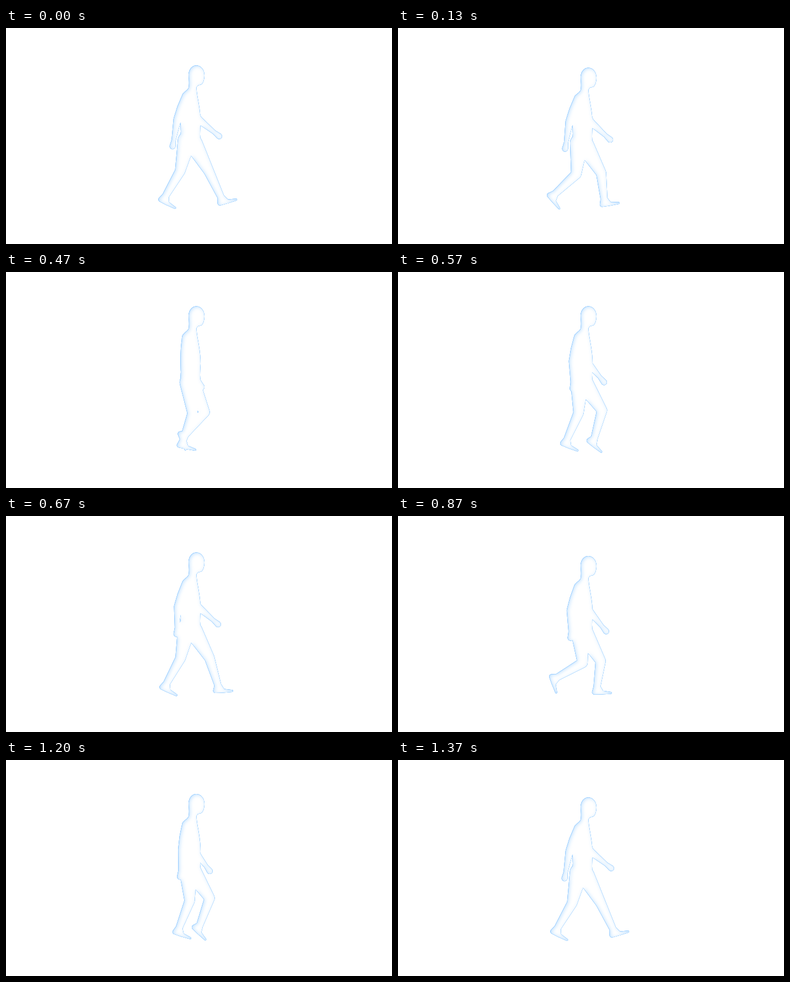
An HTML page with a canvas that plays this animation: 700 px wide and 394 px high, repeating every 1.41 s.

```html
<!DOCTYPE html>
<html lang="en">
<head>
<meta charset="utf-8">
<title>Walk cycle</title>
<style>
  html, body { margin: 0; width: 100%; height: 100%; overflow: hidden; background: #fff; }
  canvas { display: block; }
</style>
</head>
<body>
<canvas id="stage" width="700" height="394"></canvas>
<script>
const LOOP = 1410, STEPS = 40;
const W = 700, H = 394, ANKLE_FLOOR = 312;
const ctx = document.getElementById('stage').getContext('2d');
const outside = new OffscreenCanvas(W, H);
const octx = outside.getContext('2d');

// Eight evenly spaced leg poses from heel strike on, in degrees:
// thigh and shank lean forward from vertical, foot tips down from level
const legPoses = [
  [29, 25, -12], [30, -10, 4], [15.5, -16, 5], [1.5, -22, 24],
  [-12.5, -32, 33], [5, -60, 74], [15, -55, 86], [33, -20, 48]
];

const torso = new Path2D(
  'M331 41C333 30 331 26 331 16C332 6 338 0 345 0C353 0 360 7 360 18' +
  'C360 26 357 34 354 35L348 36.5L345.5 40C346 52 349 64 350 72' +
  'C352 84 353 95 353 105Q352 118 352 126L353 140L345 156L320 150' +
  'C316 140 316 130 317 120C316 100 316 70 320 56C322 49 324 48 328 45Z');

const rad = degrees => degrees * Math.PI / 180;
const wave = (step, lag = 0, period = STEPS) => Math.cos(2 * Math.PI * (step - lag) / period);
const mix = (a, b, s) => a.map((v, i) => v + (b[i] - v) * s);
const hang = ([x, y], length, lean) =>
  [x + length * Math.sin(rad(lean)), y + length * Math.cos(rad(lean))];

// Smooth periodic curve through the leg poses
function legPose(step) {
  const n = legPoses.length, u = step / STEPS * n;
  const i = Math.floor(u), s = u - i;
  const [a, b, c, d] = [-1, 0, 1, 2].map(o => legPoses[(i + o + n) % n]);
  return b.map((v, j) => v + s / 2 * (c[j] - a[j]
    + s * (2 * a[j] - 5 * v + 4 * c[j] - d[j] + s * (3 * (v - c[j]) + d[j] - a[j]))));
}

// Chain of tapered capsules; each joint is [[x, y], radius]
function limb(path, ...joints) {
  for (let i = 1; i < joints.length; i++) {
    const [[x0, y0], r0] = joints[i - 1], [[x1, y1], r1] = joints[i];
    const angle = Math.atan2(y1 - y0, x1 - x0);
    const ratio = (r0 - r1) / Math.hypot(x1 - x0, y1 - y0);
    const spread = Math.acos(Math.max(-1, Math.min(1, ratio)));
    const part = new Path2D();
    part.arc(x0, y0, r0, angle + spread, angle - spread + 2 * Math.PI);
    part.arc(x1, y1, r1, angle - spread, angle + spread);
    part.closePath();
    path.addPath(part);
  }
}

function addLeg(body, top, step) {
  const [thigh, shank, tip] = legPose(step);
  const sway = wave(step);
  const hip = [334 + 6 * sway, top + 140 + 3 * sway];
  const knee = hang(hip, 57, thigh);
  const ankle = hang(knee, 53, shank);
  ankle[1] = Math.min(ankle[1], ANKLE_FLOOR);
  const heel = hang(hang(ankle, 9.5, -tip), -4, 90 - tip);
  const toe = hang(heel, 30, 90 - tip);
  const arch = mix(heel, toe, .45);
  limb(body, [hip, 16.5], [knee, 9.3], [ankle, 6.3], [heel, 4.5], [arch, 3.6], [toe, 1.8]);
  limb(body, [ankle, 6.3], [arch, 3.6]);
}

function addArm(body, top, step, bend, swing) {
  const shoulder = [328.5, top + 57];
  const elbow = hang(shoulder, 45, 1 + 25 * wave(step, 1.5));
  const fore = bend + swing * wave(step, .5) + 4 * wave(step, .5, STEPS / 2);
  const hand = hang(elbow, 50, fore);
  limb(body, [shoulder, 9.5], [mix(shoulder, elbow, .5), 9.3], [elbow, 7],
    [mix(elbow, hand, .77), 3.8], [hand, 5.4]);
}

function bodyAt(step) {
  const body = new Path2D();
  const top = 67.5 + 5.6 * wave(step, 4.6, STEPS / 2);
  body.addPath(torso, new DOMMatrix([1, 0, 0, 1, 0, top]));
  addLeg(body, top, step % STEPS);
  addLeg(body, top, (step + 19.5) % STEPS);
  addArm(body, top, step, 20, 27);
  addArm(body, top, step + STEPS / 2, 16, 30);
  return body;
}

function innerGlow(color, blur, dx, dy) {
  ctx.shadowColor = color;
  ctx.shadowBlur = blur;
  ctx.shadowOffsetX = dx;
  ctx.shadowOffsetY = dy;
  ctx.drawImage(outside, 0, 0);
}

function draw(step) {
  const body = bodyAt(step);
  octx.globalCompositeOperation = 'source-over';
  octx.fillStyle = '#4aa8ff';
  octx.fillRect(0, 0, W, H);
  octx.globalCompositeOperation = 'destination-out';
  octx.fill(body);

  ctx.fillStyle = '#fff';
  ctx.fillRect(0, 0, W, H);
  ctx.save();
  ctx.clip(body);
  innerGlow('rgba(70,165,255,.36)', 7, 1.8, 1);
  innerGlow('rgba(60,155,255,.4)', 1, .3, .2);
  ctx.restore();
}

// 30 steps per second, held on a 10 ms clock
function frame() {
  const ticks = Math.floor(performance.now() % LOOP / 10);
  draw(Math.max(0, Math.min(STEPS, Math.floor((3 * ticks - 9) / 10))));
  requestAnimationFrame(frame);
}
frame();
</script>
</body>
</html>
```
